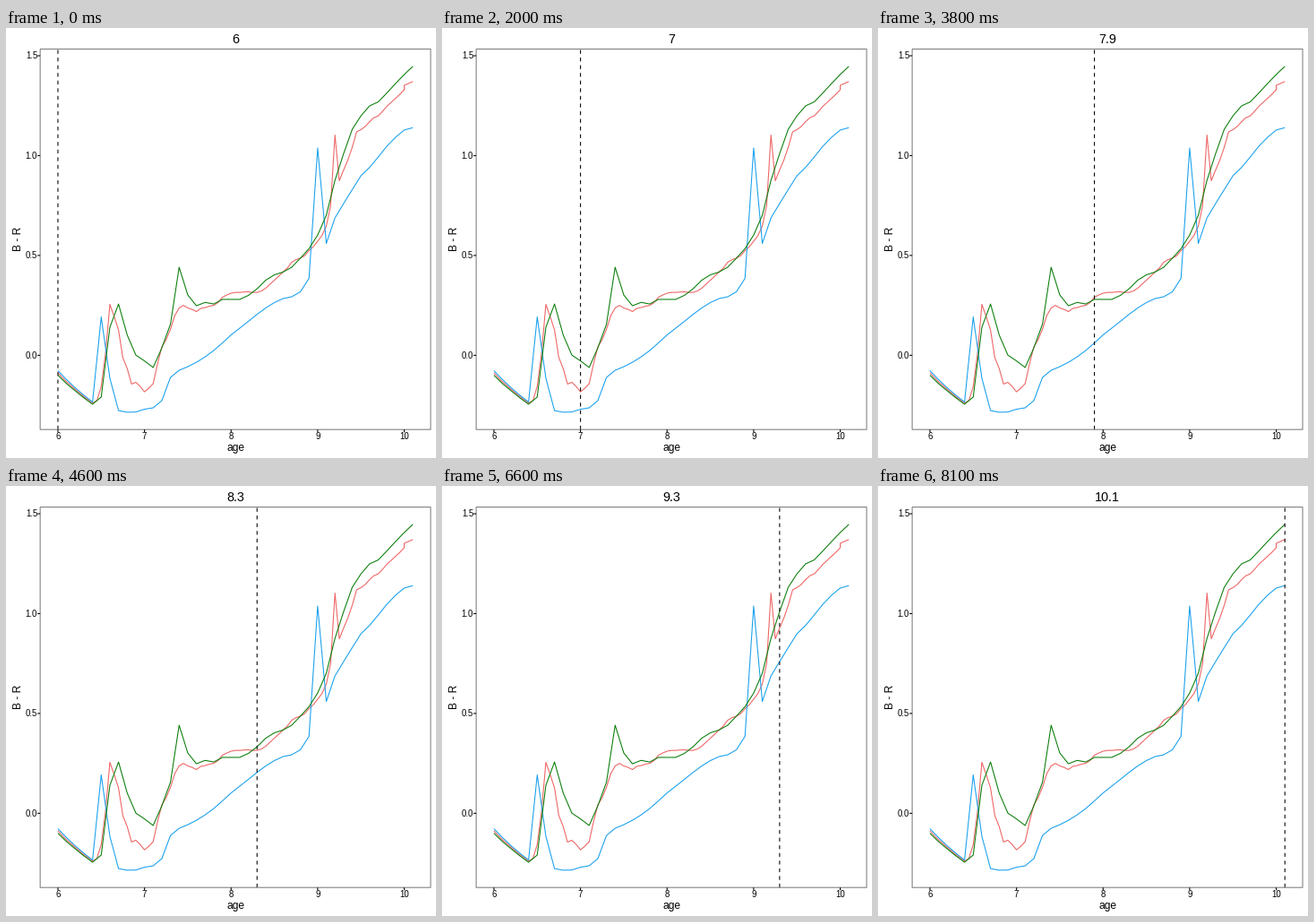
A matplotlib script for the animation above (8.2 s loop, 480x480 px).

```python
import numpy as np
import matplotlib.pyplot as plt
from matplotlib.animation import FuncAnimation

SIZE = 480
DPI = 72  # one point equals one pixel
LEFT, RIGHT, TOP, BOTTOM = 38.15, 474, 23.5, 448.2
LINE = 1.07

RED = [
    -.088, -.111, -.133, -.152, -.171, -.189, -.207, -.223, -.239, -.227,
    -.156, .010, .255, .194, .127, -.012, -.066, -.144, -.135, -.156,
    -.183, -.165, -.142, -.044, .042, .078, .131, .199, .237, .250,
    .237, .230, .219, .235, .239, .246, .250, .264, .291, .302,
    .311, .315, .315, .317, .318, .315, .315, .322, .336, .356,
    .376, .396, .417, .437, .466, .479, .486, .499, .524, .544,
    .571, .600, .647, .750, 1.103, .874, .928, .979, 1.042, 1.119,
    1.130, 1.146, 1.170, 1.190, 1.199, 1.222, 1.247, 1.267, 1.287, 1.307,
    1.330, 1.352, 1.371,
]
BLUE = [
    -.077, -.122, -.163, -.200, -.234, .192, -.115, -.277, -.285, -.284,
    -.270, -.263, -.227, -.111, -.075, -.057, -.035, -.008, .024, .062,
    .102, .136, .170, .205, .237, .264, .284, .293, .318, .385,
    1.038, .560, .688, .760, .830, .899, .941, .993, 1.047, 1.092,
    1.128, 1.140,
]
GREEN = [
    -.100, -.142, -.178, -.213, -.245, -.209, .140, .257, .102, .001,
    -.028, -.061, .037, .156, .441, .302, .248, .265, .257, .280,
    .280, .280, .300, .333, .376, .403, .417, .441, .486, .534,
    .602, .701, .876, 1.010, 1.132, 1.199, 1.249, 1.269, 1.314, 1.361,
    1.406, 1.447,
]

coarse = 6 + np.arange(42) / 10
fine = 6 + np.arange(81) / 20
ages = np.append(fine, 10.1)


def scale(value, low, high, start, end):
    """Map data to pixels with 5% padding at both ends."""
    share = (np.asarray(value) - low) / (high - low)
    return start + (end - start) * (0.05 + share) / 1.1


def px(age):
    return scale(age, 6, 10.1, LEFT, RIGHT)


def py(colour):
    return scale(colour, -.285, 1.447, BOTTOM, TOP)


plt.rcParams["font.family"] = "Liberation Sans"
fig = plt.figure(figsize=(SIZE / DPI, SIZE / DPI), dpi=DPI, facecolor="white")
ax = fig.add_axes([0, 0, 1, 1])
ax.set(xlim=(0, SIZE), ylim=(SIZE, 0))
ax.axis("off")


def line(xs, ys, color, **style):
    return ax.plot(xs, ys, color=color, lw=LINE, snap=False,
                   solid_capstyle="butt", dash_capstyle="butt", **style)[0]


def label(x, y, text, size, ha="center", **style):
    return ax.text(x, y, text, size=size, ha=ha, va="baseline",
                   color="black", **style)


line(px(np.append(fine, [10, 10.1])), py(RED), "#EE6363", solid_joinstyle="round")
line(px(coarse), py(BLUE), "#18A0EE", solid_joinstyle="round")
line(px(coarse), py(GREEN), "#0A7D0A", solid_joinstyle="round")
marker = line([px(6)] * 2, [BOTTOM, TOP], "black", ls=(0, (4, 4)))

line([LEFT, RIGHT, RIGHT, LEFT, LEFT], [TOP, TOP, BOTTOM, BOTTOM, TOP], "#7F7F7F")
for age in range(6, 11):
    line([px(age)] * 2, [BOTTOM, BOTTOM + 3], "black")
    label(px(age), 458.6, str(age), 9.6)
for value in (0, .5, 1, 1.5):
    line([LEFT - 3, LEFT], [py(value)] * 2, "black")
    label(LEFT - 3, py(value) + 3.4, f"{value:.1f}", 9.6, ha="right")

middle = (LEFT + RIGHT) / 2
label(middle, 471.6, "age", 12)
label(17, (TOP + BOTTOM) / 2, "B - R", 12, rotation=90,
      rotation_mode="anchor")
title = label(middle, 16.7, "6", 14.4)


def draw(step):
    age = ages[step]
    marker.set_xdata([px(age)] * 2)
    title.set_text(f"{age:g}")
    return marker, title


animation = FuncAnimation(fig, draw, frames=len(ages), interval=100,
                          repeat=True, repeat_delay=0)
plt.show()
```
